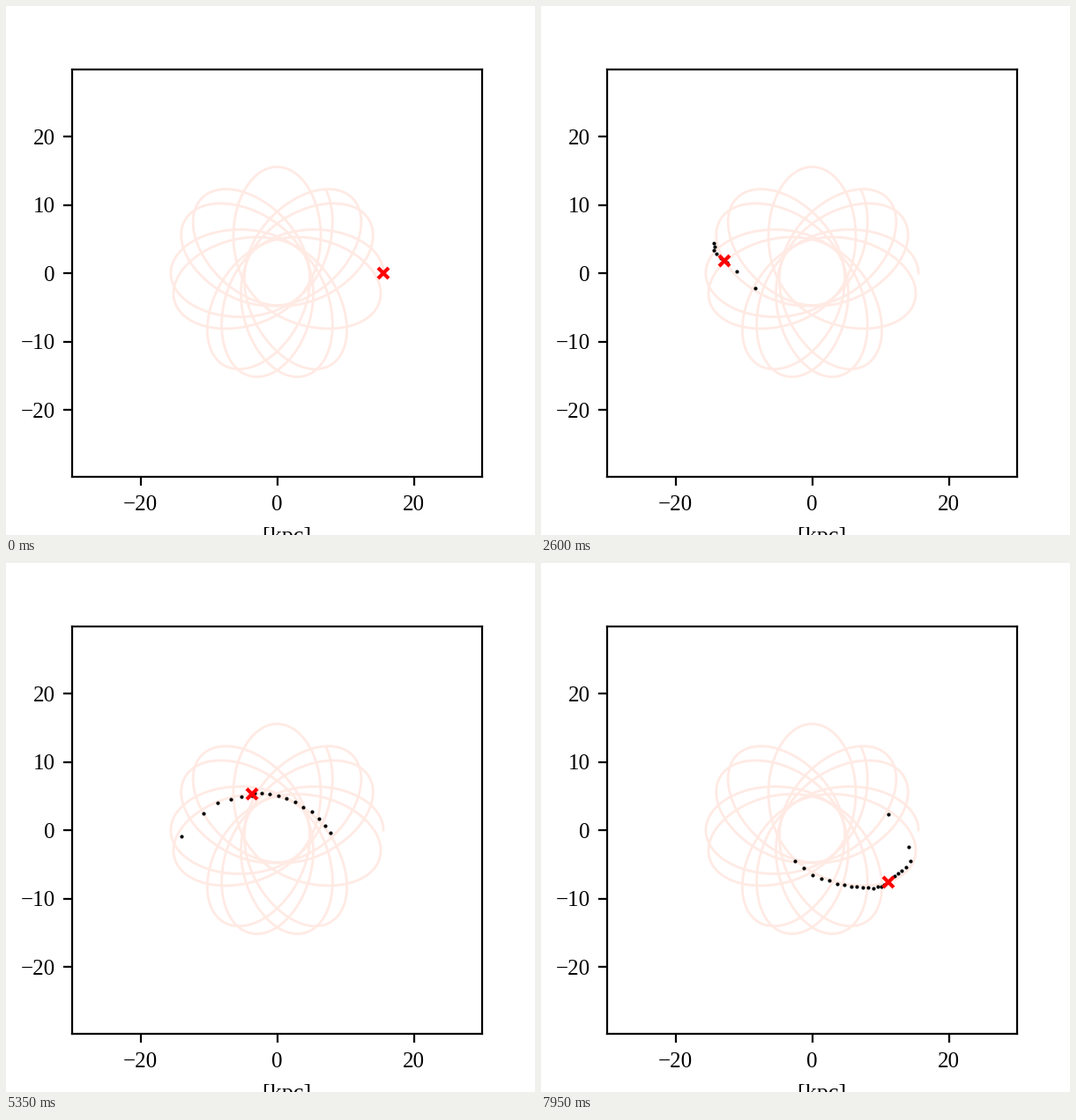
Write a matplotlib script that moves like this. It is 600 by 600 pixels and loops after 8 s.

```python
import numpy as np
import matplotlib.pyplot as plt
from matplotlib.animation import FuncAnimation

plt.rcParams["font.family"] = "Liberation Serif"

FRAMES, INTERVAL = 160, 50
R_APO, R_PERI = 15.56, 4.73      # turning radii
PERIOD = 23.38                   # radial period in frames
TURN = np.radians(255)           # angle between two outer turning points
POWER = 0.1                      # potential ~ -r**-POWER
TRAILING, LEADING = 15, 7        # stars lost on each side


def radial_cycle(n=2000):
    """Time, azimuth and radius over one cycle from apocentre to apocentre."""
    u0 = R_PERI / R_APO
    mid, half = (1 + u0) / 2, (1 - u0) / 2
    edge = np.linspace(0, 2 * np.pi, n + 1)
    eta = (edge[:-1] + edge[1:]) / 2
    u = mid - half * np.cos(eta)
    l2 = 2 / POWER * (1 - u0 ** POWER) / (1 - u0 ** 2)
    speed = np.sqrt(l2 * (1 - u ** 2) + 2 / POWER * (u ** POWER - 1))
    dphi = np.abs(np.sin(eta)) / speed
    phi = np.append(0, np.cumsum(dphi))
    t = np.append(0, np.cumsum(dphi / u ** 2))
    r = R_PERI / (mid - half * np.cos(edge))
    return t / t[-1], phi / phi[-1] * TURN, r


CYCLE_T, CYCLE_PHI, CYCLE_R = radial_cycle()


def orbit(t):
    turns, part = np.divmod(np.asarray(t) / PERIOD, 1)
    phi = turns * TURN + np.interp(part, CYCLE_T, CYCLE_PHI)
    r = np.interp(part, CYCLE_T, CYCLE_R)
    return r * np.cos(phi), r * np.sin(phi)


# Stars leave at a steady rate; the earliest ones drift away fastest.
release = np.append(np.linspace(6, 140, TRAILING), np.linspace(10, 125, LEADING))
drift = np.append(np.linspace(-0.042, -0.032, TRAILING),
                  0.03 + 0.042 * 0.4 ** np.arange(LEADING))
rng = np.random.default_rng(4)
scale = 1 - drift + rng.normal(0, 0.01, len(drift))

fig, ax = plt.subplots(figsize=(3, 3), dpi=200)
ax.set_xlim(-30, 30)
ax.set_ylim(-29.8, 29.82)
ax.set_xticks(range(-20, 21, 20))
ax.set_yticks(range(-20, 21, 10))
ax.tick_params(labelsize=9)
ax.tick_params(axis="x", pad=4.1)
fig.text(318.5 / 600, -8 / 600, "[kpc]", size=9.4, ha="center", va="baseline")

ax.plot(*orbit(np.linspace(0, 300, 6000)), color="#ffeae4", lw=1)
dots, = ax.plot([], [], "o", color="black", ms=1.5, mew=0, zorder=3)
cross, = ax.plot([], [], "x", color="red", ms=4.47, mew=1.5, zorder=4)


def update(frame):
    out = release <= frame
    x, y = orbit(frame + drift[out] * (frame - release[out]))
    dots.set_data(scale[out] * x, scale[out] * y)
    cx, cy = orbit(frame)
    cross.set_data([cx], [cy])
    return dots, cross


anim = FuncAnimation(fig, update, frames=FRAMES, interval=INTERVAL,
                     repeat=True, repeat_delay=0)
plt.show()
```
